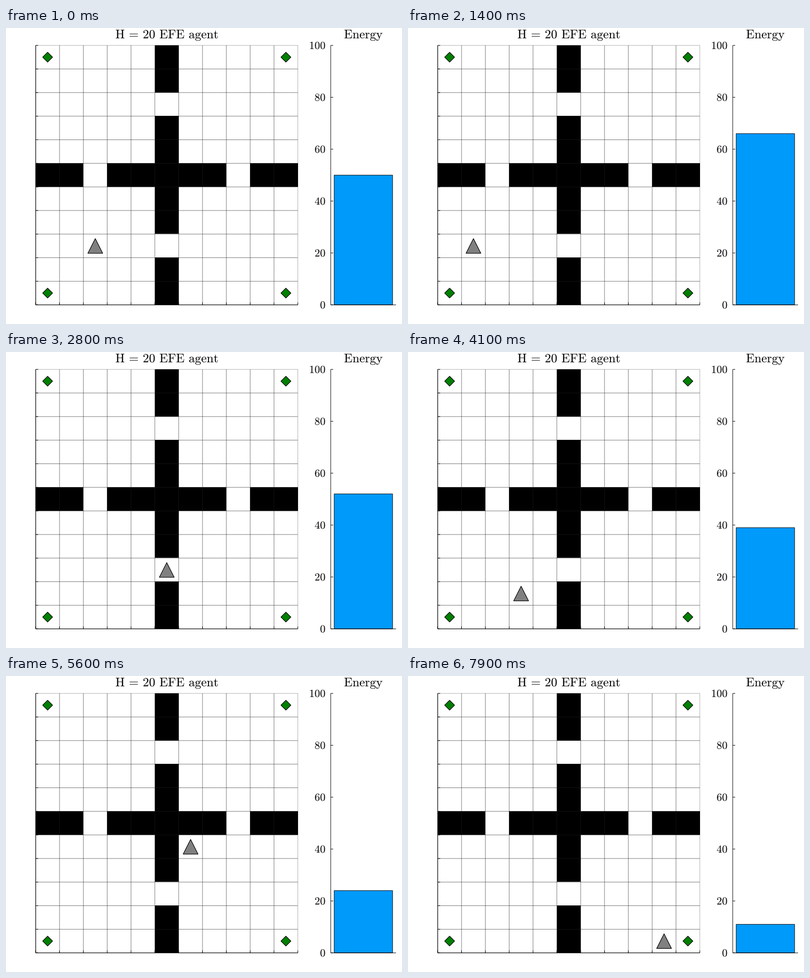
These frames come from a looping animation (800x600 px, 8 s). A matplotlib script:

```python
import matplotlib.pyplot as plt
from matplotlib.animation import FuncAnimation
from matplotlib.patches import PathPatch, Polygon, Rectangle
from matplotlib.textpath import TextPath
from matplotlib.transforms import Affine2D

plt.rcParams["mathtext.fontset"] = "cm"

W, H, DPI = 800, 600, 100
PX = 72 / DPI                       # points per pixel
N = 11                              # cells per side
LEFT, RIGHT, TOP, BOTTOM = 60.0, 589.55, 35.25, 561.2
WALL_TOP = 34.95
CW, CH = (RIGHT - LEFT) / N, (BOTTOM - TOP) / N
BAR_AXIS, BAR_END = 656.0, 788
BAR_L, BAR_R = 663.0, 781.0
GAPS = (2, 8)
FOOD = [(0, 0), (0, N - 1), (N - 1, 0), (N - 1, N - 1)]
STEPS = {"L": (-1, 0), "R": (1, 0), "U": (0, 1), "D": (0, -1), ".": (0, 0)}
MOVES = (
    "LDLD.RULD" "UURDUDLUR" "LDRRURDRU" "RRDULLLDR" "DLURLURUD"
    "RRURU.DLD" "UUDDLLLDU" ".RUDRRRUD" "RDRDRL."
)


def simulate():
    """Agent cell and energy for every step; food pays on the next step."""
    pos, energy = (2, 2), 50
    states = [(pos, energy)]
    for m in MOVES:
        energy += 9 if pos in FOOD else -1
        dx, dy = STEPS[m]
        pos = (pos[0] + dx, pos[1] + dy)
        states.append((pos, energy))
    return states


def center(col, row):
    return LEFT + (col + 0.5) * CW, BOTTOM - (row + 0.5) * CH


def level(energy):
    return BOTTOM - energy / 100 * (BOTTOM - TOP)


def is_wall(col, row):
    return (col == 5 and row not in GAPS) or (row == 5 and col not in GAPS)


def triangle(col, row):
    x, y = center(col, row)
    return [(x - 15, y + 15), (x + 15, y + 15), (x, y - 14.8)]


fig = plt.figure(figsize=(W / DPI, H / DPI), dpi=DPI, facecolor="white")
ax = fig.add_axes([0, 0, 1, 1])
ax.set(xlim=(0, W), ylim=(H, 0))
ax.axis("off")


def line(x0, y0, x1, y1, color="black", z=4):
    ax.plot([x0, x1], [y0, y1], color=color, lw=PX, zorder=z,
            solid_capstyle="butt", snap=False)


def label(x, y, text, size, align):
    """Outlined text; align is the share of its width left of x."""
    path = TextPath((0, 0), text, size=size)
    box = path.get_extents()
    shift = x - box.x0 - align * box.width
    path = Affine2D().scale(1, -1).translate(shift, y).transform_path(path)
    ax.add_patch(PathPatch(path, facecolor="black", lw=0, snap=False))


def marker(points, color, z):
    return ax.add_patch(Polygon(points, facecolor=color, edgecolor="black",
                                lw=1.2 * PX, joinstyle="round", zorder=z))


# Walls
for col in range(N):
    for row in range(N):
        if is_wall(col, row):
            corner = LEFT + col * CW, WALL_TOP + (N - 1 - row) * CH
            ax.add_patch(Rectangle(corner, CW, CH, facecolor="black",
                                   lw=0, zorder=1))

# Grid, frame and ticks
grid = (0.12, 0.12, 0.12, 0.6)
pale = (0.12, 0.12, 0.12, 0.35)
for i in range(N + 1):
    x, y = LEFT + i * CW, TOP + i * CH
    line(x, TOP, x, BOTTOM, pale if i == N else grid, 2)
    line(LEFT, y, RIGHT, y, pale if i == 0 else grid, 2)
    line(x, BOTTOM, x, BOTTOM - 5)
    line(LEFT, y, LEFT + 5, y)
line(LEFT, TOP, LEFT, BOTTOM)
line(LEFT, BOTTOM, RIGHT, BOTTOM)

# Energy axis
line(BAR_AXIS, TOP, BAR_AXIS, BOTTOM)
line(BAR_AXIS, BOTTOM, BAR_END, BOTTOM)
for v in range(0, 101, 20):
    y = level(v)
    line(BAR_AXIS, y, BAR_AXIS + 5, y)
    label(644.5, y + 7.3, rf"$\mathrm{{{v}}}$", 22, 1)

title = (r"$\mathrm{H}\hspace{0.18}=\hspace{0.18}\mathrm{20}"
         r"\hspace{0.38}\mathrm{EFE}\hspace{0.38}\mathrm{agent}$")
label((LEFT + RIGHT) / 2, 21, title, 25.2, 0.5)
label((BAR_AXIS + BAR_END) / 2, 21, r"$\mathrm{Energy}$", 25.2, 0.5)

for cell in FOOD:
    x, y = center(*cell)
    marker([(x - 10, y), (x, y - 10), (x + 10, y), (x, y + 10)], "#008000", 5)

states = simulate()
agent = marker(triangle(2, 2), "#808080", 6)
bar = ax.add_patch(Rectangle((BAR_L, BOTTOM), BAR_R - BAR_L, 0,
                             facecolor="#009AFA", edgecolor="black",
                             lw=PX, zorder=3, snap=False))


def update(i):
    cell, energy = states[i]
    agent.set_xy(triangle(*cell))
    bar.set_height(level(energy) - BOTTOM)
    return agent, bar


anim = FuncAnimation(fig, update, frames=len(states), interval=100,
                     repeat=True, repeat_delay=0)
plt.show()
```
